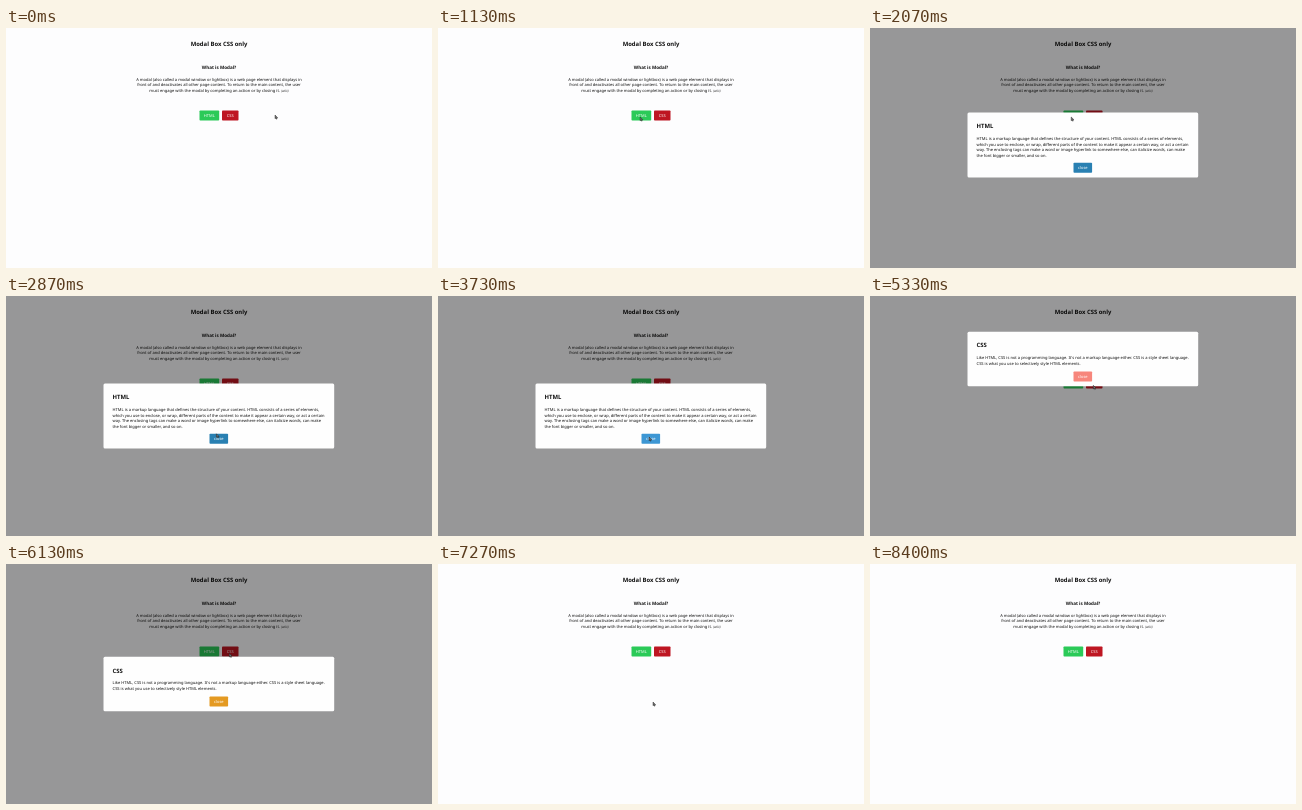
An HTML page for the animation above (8470 ms loop, 426x240 px).

```html
<!DOCTYPE html>
<html lang="en">
<head>
<meta charset="utf-8">
<title>Modal Box CSS only</title>
<style>
html, body { margin: 0; height: 100%; overflow: hidden; background: #fdfdfe; }
svg { display: block; width: 100vw; height: 100vh; }
text { font: 4.04px "Noto Sans", "Open Sans", sans-serif; fill: #111; text-rendering: geometricPrecision; }
.mid { text-anchor: middle; }
.bold { font-weight: 700; }
.title { font-size: 5.9px; }
.sub { font-size: 4.55px; }
.label { fill: #fff; font-size: 4px; }
.small { font-size: 3.3px; font-style: italic; fill: #333; }
</style>
</head>
<body>
<svg viewBox="0 0 426 240">
  <g id="page">
    <text class="mid bold title" x="213" y="18.3">Modal Box CSS only</text>
    <text class="mid bold sub" x="213" y="41.4">What is Modal?</text>
    <text class="mid" x="213" y="52.5">A modal (also called a modal window or lightbox) is a web page element that displays in</text>
    <text class="mid" x="213" y="58.1">front of and deactivates all other page content. To return to the main content, the user</text>
    <text class="mid" x="213" y="63.7">must engage with the modal by completing an action or by closing it. <tspan class="small">(wiki)</tspan></text>
    <rect x="193.5" y="82.5" width="19.7" height="10" rx=".8" fill="#2bca58"/>
    <text class="mid label" x="203.3" y="89">HTML</text>
    <rect x="216" y="82.5" width="16.5" height="10" rx=".8" fill="#be1622"/>
    <text class="mid label" x="224.2" y="89">CSS</text>
  </g>
  <rect id="shade" width="426" height="240"/>
  <g id="modals"></g>
  <path id="cursor" d="M0 0V3.7L.9 2.9L1.5 4.2L2.1 3.9L1.5 2.7H2.7Z" fill="#777" stroke="#111" stroke-width=".4"/>
</svg>
<script>
const LOOP = 8470, OPEN = 500, CLOSE = 350;
const get = id => document.getElementById(id);
const clamp = v => Math.max(0, Math.min(1, v));
const mix = (a, b, p) => `rgb(${a.map((v, i) => Math.round(v + (b[i] - v) * p))})`;

const modals = [
  { title: "HTML", height: 65, open: 1700, close: 3900, tint: [2900, 200],
    from: [41, 128, 178], to: [61, 151, 212], lines: [
      "HTML is a markup language that defines the structure of your content. HTML consists of a series of elements,",
      "which you use to enclose, or wrap, different parts of the content to make it appear a certain way, or act a certain",
      "way. The enclosing tags can make a word or image hyperlink to somewhere else, can italicize words, can make",
      "the font bigger or smaller, and so on."] },
  { title: "CSS", height: 54.5, open: 5172, close: 6800, tint: [5340, 250],
    from: [247, 134, 124], to: [228, 154, 34], lines: [
      "Like HTML, CSS is not a programming language. It's not a markup language either. CSS is a style sheet language.",
      "CSS is what you use to selectively style HTML elements."] }
];

for (const m of modals) {
  const g = document.createElementNS("http://www.w3.org/2000/svg", "g");
  const top = 120 - m.height / 2, button = top + m.height - 14.7;
  g.innerHTML = `<rect x="97.5" y="${top}" width="230.7" height="${m.height}" rx="1.5" fill="#fefefe"/>
    <text class="bold title" x="106.6" y="${top + 15.8}">${m.title}</text>` +
    m.lines.map((s, i) => `<text x="106.6" y="${top + 27.6 + i * 5.5}">${s}</text>`).join("") +
    `<rect class="button" x="203.5" y="${button}" width="18.6" height="10" rx=".8"/>
    <text class="mid label" x="212.8" y="${button + 6.2}">close</text>`;
  get("modals").append(g);
  m.node = g;
  m.button = g.querySelector(".button");
}

// time, x, y
const path = [
  [0, 269, 87], [200, 269, 87], [1200, 201.2, 89], [2150, 201.2, 89], [3000, 211, 141],
  [4050, 211, 141], [4750, 223.3, 89.3], [6200, 223.3, 89.3], [6650, 215, 138],
  [7350, 215, 138], [8200, 432, 30], [LOOP, 432, 30]
];

function cursorAt(t) {
  const i = path.findIndex(k => k[0] > t);
  const [a, b] = [path[i - 1], path[i]];
  const p = (t - a[0]) / (b[0] - a[0]), e = p * p * (3 - 2 * p);
  return [a[1] + (b[1] - a[1]) * e, a[2] + (b[2] - a[2]) * e];
}

function draw(now) {
  const t = now % LOOP;
  let shade = 0;
  for (const m of modals) {
    const rise = clamp((t - m.open) / OPEN), leave = clamp((t - m.close) / CLOSE);
    const shift = -180 * ((1 - rise) ** 3 + leave ** 2);
    m.node.setAttribute("transform", `translate(0 ${shift})`);
    m.node.setAttribute("visibility", rise > 0 && leave < 1 ? "visible" : "hidden");
    m.button.setAttribute("fill", mix(m.from, m.to, clamp((t - m.tint[0]) / m.tint[1])));
    shade = Math.max(shade, Math.min(clamp((t - m.open) / 150), 1 - leave));
  }
  get("shade").setAttribute("opacity", .405 * shade);
  get("page").style.filter = shade ? `blur(${.75 * shade}px)` : "none";
  get("cursor").setAttribute("transform", `translate(${cursorAt(t)})`);
}

const start = performance.now();
function tick() {
  draw(performance.now() - start);
  requestAnimationFrame(tick);
}
tick();
</script>
</body>
</html>
```
